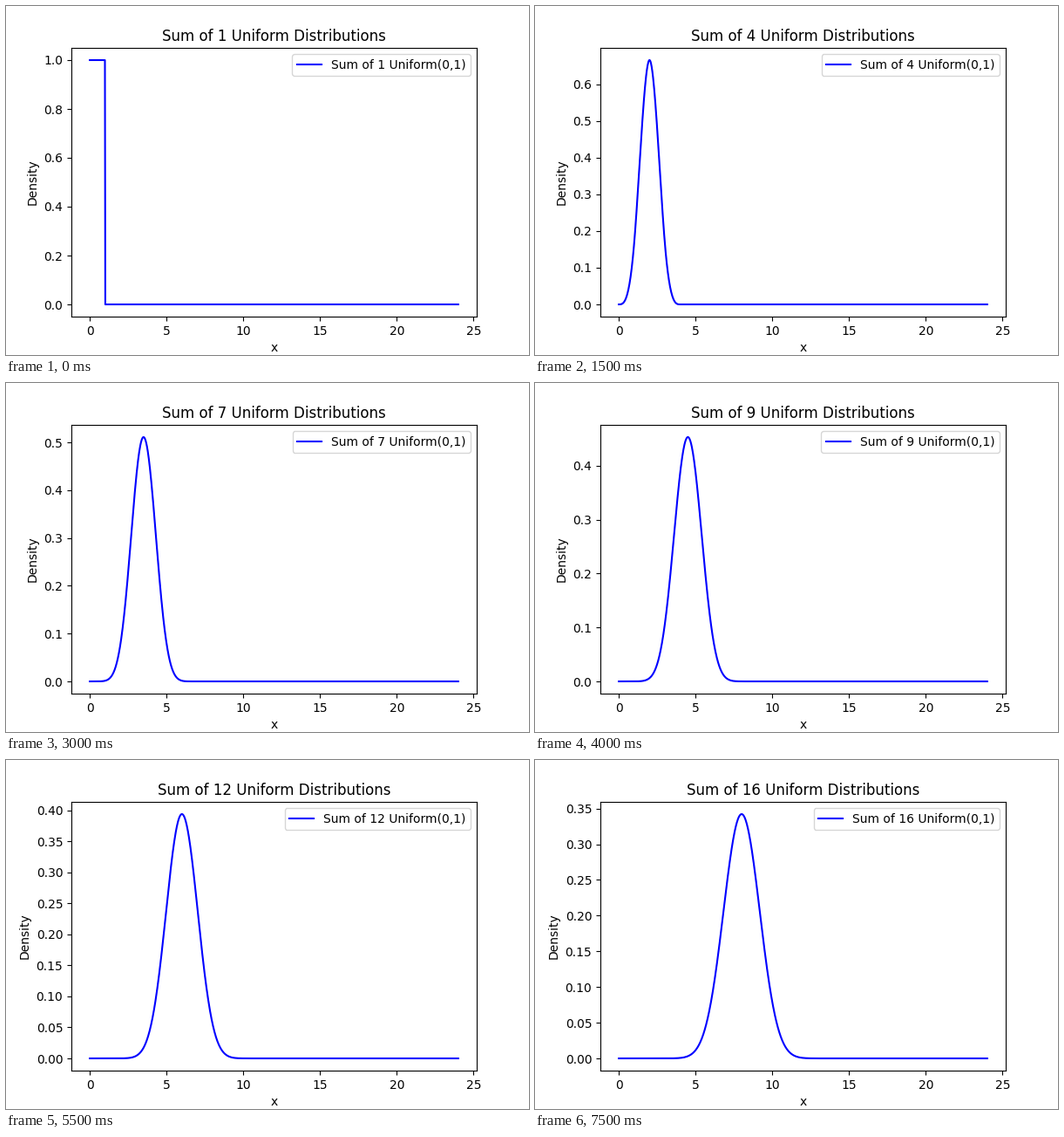
Recreate the animation shown at these times as a matplotlib script. Size 600 by 400 pixels, loop 8000 ms.

```python
from math import comb, factorial

import matplotlib.pyplot as plt
import numpy as np
from matplotlib.animation import FuncAnimation

COUNT = 16
x = np.linspace(0, 24, 1000)


def density(x, n):
    """Irwin-Hall density, folded about n / 2 for numerical stability."""
    u = np.minimum(x, n - x)
    total = np.zeros_like(x)
    for k in range(n // 2 + 1):
        term = np.where(u >= k, (u - k) ** (n - 1), 0)
        total += (-1) ** k * comb(n, k) * term
    return total / factorial(n - 1)


fig, ax = plt.subplots(figsize=(6, 4), dpi=100)


def update(frame):
    n = frame + 1
    ax.clear()
    ax.plot(x, density(x, n), color="blue", label=f"Sum of {n} Uniform(0,1)")
    ax.set_title(f"Sum of {n} Uniform Distributions")
    ax.set_xlabel("x")
    ax.set_ylabel("Density")
    ax.legend(loc="upper right")


anim = FuncAnimation(fig, update, frames=COUNT, init_func=lambda: None,
                     interval=500, repeat=True, repeat_delay=0)
plt.show()
```
